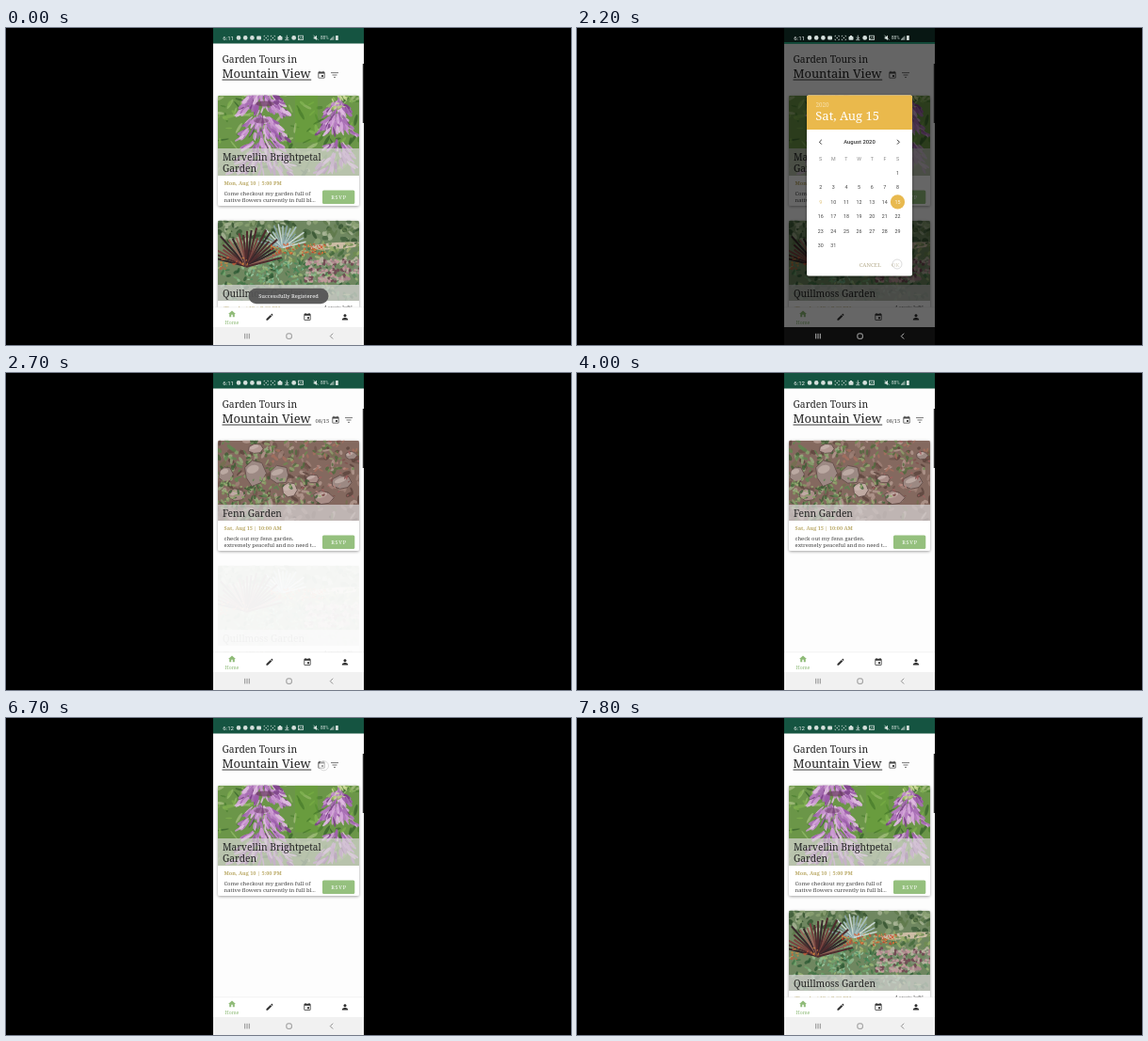
These frames come from a looping animation (600x337 px, 8 s). An HTML page:

```html
<!DOCTYPE html>
<html lang="en">
<head>
<meta charset="utf-8">
<title>Garden tours app</title>
<style>
  html, body { margin: 0; width: 100%; height: 100%; overflow: hidden; background: #000; }
  svg { display: block; }
  text { font-family: "Noto Serif", "Liberation Serif", serif; fill: #222; }
  .sans { font-family: Roboto, "Liberation Sans", sans-serif; }
  .mid { text-anchor: middle; }
</style>
</head>
<body>
<svg id="stage" width="600" height="337" viewBox="0 0 600 337"></svg>
<script>
const LOOP = 8000;
const ICON = {
  event: "M17 12h-5v5h5v-5zM16 1v2H8V1H6v2H5c-1.1 0-2 .9-2 2v14c0 1.1.9 2 2 2h14c1.1 0 2-.9 2-2V5c0-1.1-.9-2-2-2h-1V1h-2zm3 18H5V8h14v11z",
  home: "M10 20v-6h4v6h5v-8h3L12 3 2 12h3v8z",
  edit: "M3 17.2V21h3.8L17.8 9.9l-3.7-3.7L3 17.2zM20.7 7c.4-.4.4-1 0-1.4l-2.3-2.3c-.4-.4-1-.4-1.4 0l-1.9 1.8 3.8 3.8 1.8-1.9z",
  person: "M12 12c2.2 0 4-1.8 4-4s-1.8-4-4-4-4 1.8-4 4 1.8 4 4 4zm0 2c-2.7 0-8 1.3-8 4v2h16v-2c0-2.7-5.3-4-8-4z"
};

let seed = 7;
const rnd = () => (seed = (seed * 16807) % 2147483647) / 2147483647;
const between = (a, b) => a + (b - a) * rnd();
const pick = s => { const list = s.split(" "); return list[Math.floor(rnd() * list.length)]; };
const many = (n, fn) => Array.from({ length: n }, (_, i) => fn(i)).join("");

const rect = (x, y, w, h, fill, more = "") =>
  `<rect x="${x}" y="${y}" width="${w}" height="${h}" fill="${fill}" ${more}/>`;
const disc = (x, y, r, fill, more = "") => `<circle cx="${x}" cy="${y}" r="${r}" fill="${fill}" ${more}/>`;
const line = (d, color, width) => `<path d="${d}" fill="none" stroke="${color}" stroke-width="${width}"/>`;
const text = (x, y, size, str, color = "#222", more = "") =>
  `<text x="${x}" y="${y}" font-size="${size}" style="fill:${color}" ${more}>${str}</text>`;
const group = (id, body, more = "") => `<g id="${id}" ${more}>${body}</g>`;
const icon = (name, x, y, size, color) =>
  `<path transform="translate(${x - size / 2} ${y - size / 2}) scale(${size / 24})" fill="${color}" d="${ICON[name]}"/>`;
const blob = (x, y, rx, ry, turn, fill, alpha = 1) =>
  `<ellipse rx="${rx.toFixed(1)}" ry="${ry.toFixed(1)}" fill="${fill}" opacity="${alpha}" ` +
  `transform="translate(${x.toFixed(1)} ${y.toFixed(1)}) rotate(${turn.toFixed(0)})"/>`;

// Photo parts, in photo coordinates (150 wide, 86 high)
const scatter = (n, x, y, w, h, size, flat, colors, alpha = 0.8) => many(n, () =>
  blob(x + w * rnd(), y + h * rnd(), size * between(0.5, 1.2), size * flat * between(0.5, 1.2), 180 * rnd(), pick(colors), alpha));
// A tier of drooping petals, hanging outwards from the stem
const tier = (x, y, w, h, n) => many(n, () => {
  const side = between(-1, 1), down = rnd();
  return blob(x + side * w * (0.55 + 0.45 * down), y + h * (down - 0.5) + 4 * side * side,
    between(3, 6.5), between(0.8, 1.9), 90 - 60 * side + between(-18, 18),
    pick("#b279bd #c78fd0 #9d5cab #d6a8dc #7c4288 #cb98d2 #a86fb4 #dfbde0"), 0.9);
});
const spikes = (x, y, len, n, width, colors) => many(n, i => {
  const a = Math.PI * (1.08 + 0.84 * i / (n - 1)), l = len * between(0.75, 1.1);
  return line(`M${x} ${y}L${(x + Math.cos(a) * l).toFixed(1)} ${(y + Math.sin(a) * l).toFixed(1)}`, pick(colors), width);
});
const rosette = (x, y, r) => many(14, i => {
  const a = i * 2.4, d = r * (1 - i / 16);
  return blob(x + Math.cos(a) * d * 0.6, y + Math.sin(a) * d * 0.4, d * 0.4 + 0.8, d * 0.2 + 0.7, a * 57.3,
    pick("#a9868a #c09a9b #7e8d72 #b4b09d #714d54"));
});
const rock = (x, y, w, h) => {
  const pts = many(7, i => {
    const a = i * 0.9, k = between(0.8, 1.05);
    return `${(x + Math.cos(a) * w * k).toFixed(1)},${(y + Math.sin(a) * h * k).toFixed(1)} `;
  });
  return `<polygon points="${pts}" fill="${pick("#b39a94 #a88d87 #c0aaa2 #9c8983")}" stroke="#5f4a46" stroke-width=".8"/>` +
    blob(x - w * 0.15, y - h * 0.3, w * 0.55, h * 0.3, -20, "#d0beb7", 0.6);
};

const flowerPhoto = () => rect(0, 0, 150, 86, "#6b9648") +
  scatter(150, 0, 0, 150, 86, 6, 0.25, "#4f8234 #7fae4e #93bb68 #3c682d #a5bd80") +
  rect(82, 0, 24, 50, "#64a52c", 'opacity=".35"') +
  tier(48, 8, 30, 22, 110) + tier(46, 34, 30, 22, 100) +
  tier(128, 13, 16, 12, 45) + tier(126, 31, 23, 16, 80) +
  tier(48, 66, 38, 34, 110) + tier(128, 64, 24, 30, 60) +
  blob(50, 9, 10, 3, 0, "#6b3c63", 0.7) + blob(46, 27, 8, 3, 0, "#6b3c63", 0.5) +
  scatter(20, 118, 0, 20, 14, 3, 0.35, "#b9cf7e #8fbb55 #d3dc9f");

const desertPhoto = () => rect(0, 0, 150, 86, "#6f8760") +
  scatter(140, 0, 0, 150, 24, 4, 0.6, "#34522f #5f7a4c #8ba274 #466440 #a9b697") +
  blob(126, 27, 30, 3.5, -4, "#cdbda6") +
  scatter(120, 50, 24, 100, 20, 3, 0.5, "#6f8d50 #94ac68 #466b3d #b0b57d") +
  spikes(69, 29, 26, 15, 1.6, "#a9c0c0 #86a3a6 #c9d7d4") +
  scatter(240, 0, 42, 150, 44, 3.2, 0.45, "#427546 #72a76e #93be92 #2f5a35 #9db777") +
  scatter(90, 30, 34, 60, 32, 2, 0.5, "#6fae8a #9ccda4 #468a5c") +
  spikes(31, 49, 40, 23, 2, "#4f2c2e #7a4440 #35262a #95655a") +
  scatter(85, 56, 25, 58, 12, 1.3, 0.7, "#d4592f #c2402c #e08a45") +
  scatter(25, 2, 38, 30, 14, 1.3, 0.7, "#c65a3a #d0843f") +
  many(14, i => rosette(97 + (i % 5) * 12 + 3 * rnd(), 44 + Math.floor(i / 5) * 9, 6.5));

const rockPhoto = () => rect(0, 0, 150, 86, "#84695f") +
  scatter(210, 0, 0, 150, 86, 4, 0.5, "#6f554b #a08278 #5c443d #b59a90 #74714f") +
  scatter(120, 0, 0, 55, 86, 3.5, 0.5, "#5f8750 #85a56c #3f6035 #98ad80") +
  scatter(90, 50, 0, 100, 35, 3, 0.5, "#6d8a50 #929f6e #526b3e #a7705f") +
  rock(39, 35, 12, 14) + rock(65, 37, 12, 10) + rock(76, 53, 9, 9) + rock(8, 36, 8, 9) + rock(40, 9, 9, 6) +
  rock(100, 41, 8, 5) + rock(132, 45, 12, 8) + rock(112, 61, 11, 8) + rock(20, 58, 10, 7) + rock(141, 16, 7, 5) +
  scatter(110, 0, 40, 110, 32, 2.5, 0.5, "#5d8350 #85a264 #426339 #9cae75") +
  scatter(45, 90, 0, 60, 60, 2, 0.5, "#a35f60 #7f4f4c #b98a83");

function card(id, top, photo, title, date, about) {
  const band = title.length > 1 ? 29 : 17;
  const body = rect(225, top, 150, 117.5, "#fff", 'rx="2" filter="url(#shadow)"') +
    `<g transform="translate(225 ${top})" clip-path="url(#photo)">${photo()}` +
    rect(0, 85.5 - band, 150, band, "#d9d6d8", 'opacity=".7"') + "</g>" +
    title.map((s, i) => text(230, top + 81.5 - 12 * (title.length - 1 - i), 10.2, s)).join("") +
    text(231.5, top + 95, 5.55, date, "#bbaa68", 'font-weight="bold"') +
    about.map((s, i) => text(231.5, top + 106.2 + 7 * i, 5.87, s, "#444")).join("") +
    rect(336, top + 101, 34.3, 14.6, "#95c07e", 'rx="1.5"') +
    text(353.5, top + 110.4, 5.5, "RSVP", "#fff", 'class="mid" letter-spacing=".8"');
  return group(id, body);
}

const tools = x => icon("event", x, 50, 9.5, "#444") +
  line(`M${x + 10} 47.6h8M${x + 11.5} 50h5M${x + 13} 52.4h2`, "#555", 0.8);

const page = rect(220, 0, 160, 337, "#fdfdfd") +
  text(229.5, 37, 10.3, "Garden Tours in") +
  text(229.5, 53, 12.85, "Mountain View") + rect(229.5, 54.6, 94.7, 0.9, "#222") +
  group("plain", tools(335)) +
  group("dated", tools(350) + text(328.5, 52.6, 5.8, "08/15", "#444")) +
  rect(378.8, 38, 1.2, 63, "#333") +
  card("bloom", 71.5, flowerPhoto, ["Marvellin Brightpetal", "Garden"], "Mon, Aug 10 | 5:00 PM",
    ["Come checkout my garden full of", "native flowers currently in full bl..."]) +
  card("stone", 71.5, rockPhoto, ["Fenn Garden"], "Sat, Aug 15 | 10:00 AM",
    ["check out my fenn garden.", "extremely peaceful and no need t..."]) +
  group("second", card("desert", 204.5, desertPhoto, ["Quillmoss Garden"], "Thu, Aug 13 | 7:00 PM", []) +
    text(337.5, 298.8, 5.6, "4 spots left!", "#333")) +
  rect(220, 297, 160, 21, "#fff") + rect(220, 296.6, 160, 0.6, "#e8e8e8") +
  icon("home", 240, 304, 9.5, "#8fbb78") + text(240, 314.5, 5.2, "Home", "#8fbb78", 'class="mid"') +
  icon("edit", 280, 307.3, 9.5, "#333") + icon("event", 320, 307.3, 9.5, "#333") + icon("person", 360, 307.3, 9.5, "#333") +
  rect(220, 318, 160, 19, "#f1f1f1");

const navMarks = color => line("M253.7 324.8v5.6M256 324.8v5.6M258.3 324.8v5.6", color, 0.8) +
  rect(297.9, 324.9, 5.4, 5.4, "none", `rx="1.5" stroke="${color}" stroke-width=".8"`) +
  line("M347.2 324.7l-2.9 2.9 2.9 2.9", color, 0.8);

const PALE = "#d5e0dc";
const topBar = rect(220, 0, 160, 16.5, "#155441");
const topMarks = group("early", text(230.3, 12.7, 6.1, "6:11", "#f2f5f4", 'class="sans"')) +
  group("late", text(230.3, 12.7, 6.1, "6:12", "#f2f5f4", 'class="sans"')) +
  many(3, i => disc(247 + 7.2 * i, 10.4, 2.3, PALE)) +
  rect(266.2, 8.4, 4.8, 4, PALE, 'rx="1"') +
  many(2, i => rect(274 + 7.2 * i, 8.3, 4.4, 4.4, "none", `stroke="${PALE}" stroke-width=".7" stroke-dasharray="1.1 2.2 1.1 0"`) +
    disc(276.2 + 7.2 * i, 10.5, 0.7, PALE)) +
  rect(288.5, 9, 5, 3.7, PALE, 'rx=".7"') + rect(289.9, 8, 2.2, 1.2, PALE) +
  line("M298.3 7.7v3.8M296.6 10l1.7 1.7 1.7-1.7M296.2 12.7h4.2", PALE, 0.8) +
  disc(305.7, 10.4, 2.4, PALE) +
  rect(310.5, 8.2, 5, 4.4, "none", `stroke="${PALE}" stroke-width=".8"`) + line("M311 12l1.6-2 1.1 1 1.2-1", PALE, 0.7) +
  `<path d="M326.7 9.4h1.3l2-1.6v5.2l-2-1.6h-1.3z" fill="${PALE}"/>` + line("M326.5 7.7l5 5", PALE, 0.7) +
  text(334, 12.4, 4.6, "88%", PALE, 'class="sans"') +
  many(4, i => rect(344 + 1.2 * i, 11.6 - i, 0.7, 1.2 + i, PALE)) +
  rect(350, 8, 2.8, 5, PALE, 'rx=".5"');

const colX = i => 258.7 + 13.63 * i;
const rowY = i => 154 + 15.45 * i;
const label = (x, y, str, color) => text(x, y + 1.9, 5.3, str, color, 'class="sans mid"');
const chosen = (col, day) => disc(colX(col), rowY(2), 7.6, "#e8b94f") + label(colX(col), rowY(2), day, "#fff8e4");
const heading = str => text(253.3, 98, 13, str, "#fff");

const dialog = rect(244, 71.5, 112, 192, "#fff", 'rx="2" filter="url(#shadow)"') +
  `<path d="M244 108V73.5a2 2 0 0 1 2-2h108a2 2 0 0 1 2 2V108z" fill="#eab94c"/>` +
  text(253.5, 84, 6.3, "2020", "#f7e1ae") +
  text(300, 123.3, 5.9, "August 2020", "#333", 'class="sans mid" font-weight="500"') +
  line("M259.8 118.8l-2.4 2.4 2.4 2.4M340 118.8l2.4 2.4-2.4 2.4", "#333", 1) +
  many(7, i => label(colX(i), 138.7, "SMTWTFS"[i], "#8a8a8a")) +
  many(31, i => label(colX((i + 6) % 7), rowY(Math.floor((i + 6) / 7)), i + 1, i === 8 ? "#dfc27a" : "#444")) +
  group("nine", chosen(0, 9) + heading("Sun, Aug 9")) +
  group("fifteen", chosen(6, 15) + heading("Sat, Aug 15")) +
  text(299.7, 253.7, 5.9, "CANCEL", "#b3aa8a") + text(334, 253.7, 5.9, "OK", "#b3aa8a");

const touch = (id, x, y) => group(id, disc(x, y, 5, "#fff", 'fill-opacity=".5" stroke="#c4c4c4" stroke-width=".6"'));

document.getElementById("stage").innerHTML = `<defs>
  <clipPath id="photo"><path d="M0 85.5V2a2 2 0 0 1 2-2h146a2 2 0 0 1 2 2v83.5z"/></clipPath>
  <clipPath id="phone"><rect x="220" width="160" height="337"/></clipPath>
  <filter id="shadow" x="-10%" y="-10%" width="120%" height="120%">
    <feDropShadow dx="0" dy="1" stdDeviation="1.5" flood-color="#000" flood-opacity=".36"/></filter>
</defs>` + rect(0, 0, 600, 337, "#000") + `<g clip-path="url(#phone)">` +
  page + topBar + navMarks("#777") +
  group("dim", rect(220, 0, 160, 337, "#000", 'opacity=".6"') + rect(220, 0, 160, 15, "#081713") +
    rect(220, 15, 160, 1.8, "#0f4a38") + rect(220, 318, 160, 19, "#0d0d0d") + navMarks("#ddd")) +
  topMarks +
  group("toast", rect(257.5, 276.7, 85, 16.6, "#555", 'rx="8.3" opacity=".95"') +
    text(300, 287, 5.75, "Successfully Registered", "#fff", 'class="mid"')) +
  group("dialog", dialog) + touch("tapOk", 340, 251) + touch("hold", 337.5, 50.8) + "</g>";

// Opacity over time, [ms, value]; two entries at one time make a hard change
const PICK = 1500, SWAP = 2500, MINUTE = 2900, RESET = 6700;
const flip = (first, ...times) => {
  const steps = [[0, first]];
  for (const t of times) { steps.push([t, first], [t, 1 - first]); first = 1 - first; }
  return [...steps, [LOOP, first]];
};
const open = [[0, 0], [200, 0], [400, 1], [2300, 1], [2500, 0], [LOOP, 0]];
const tracks = {
  dim: open,
  dialog: open,
  toast: [[0, 1], [250, 1], [800, 0], [LOOP, 0]],
  nine: flip(1, PICK),
  fifteen: flip(0, PICK),
  plain: flip(1, SWAP, RESET),
  dated: flip(0, SWAP, RESET),
  bloom: flip(1, SWAP, RESET),
  stone: flip(0, SWAP, RESET),
  second: [[0, 1], [2400, 1], [2650, 0.06], [2720, 0.05], [2800, 0], [6800, 0], [7220, 1], [LOOP, 1]],
  early: flip(1, MINUTE),
  late: flip(0, MINUTE),
  tapOk: [[0, 0], [2100, 0], [2150, 1], [2250, 1], [2350, 0], [LOOP, 0]],
  hold: [[0, 0], [5560, 0], [5600, 1], [7150, 1], [7300, 0], [LOOP, 0]]
};
for (const [id, steps] of Object.entries(tracks)) {
  document.getElementById(id).animate(
    steps.map(([t, opacity]) => ({ offset: t / LOOP, opacity })),
    { duration: LOOP, iterations: Infinity });
}
</script>
</body>
</html>
```
